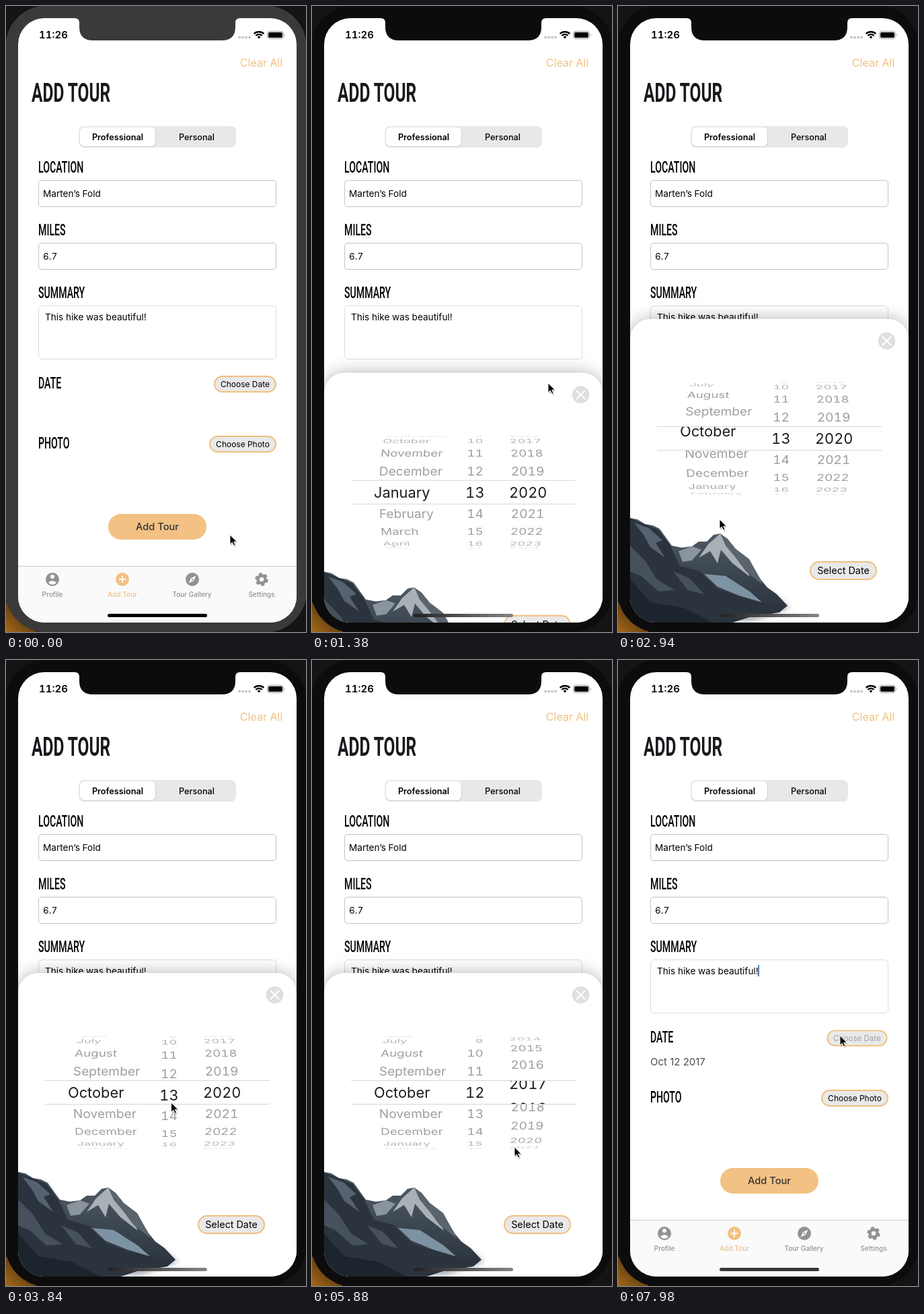
Recreate the animation shown at these times as an HTML page. Size 446 by 928 pixels, loop 8000 ms.

```html
<!DOCTYPE html>
<html lang="en">
<head>
<meta charset="utf-8">
<title>Add tour</title>
<style>
  html, body { margin: 0; width: 100%; height: 100%; overflow: hidden; background: #141414; }
  svg { display: block; width: 446px; height: 928px; }
  text { font: 13.6px Inter, sans-serif; font-variant-numeric: tabular-nums; }
  .title { font: 700 39.5px Roboto, sans-serif; fill: #17191d; }
  .label { font: 500 24px Roboto, sans-serif; }
  .mid { text-anchor: middle; }
  .field { fill: #fff; stroke: #c3c3c3; }
  .pill { fill: #e9e9e9; stroke: #f1bf80; stroke-width: 2; }
  .amber { fill: #f2c183; }
  .tab { font-size: 10px; font-weight: 500; text-anchor: middle; }
  .grey { fill: #929292; }
  .row { font-size: 19.3px; }
</style>
</head>
<body>
<svg viewBox="0 0 446 928">
  <defs>
    <clipPath id="screenClip"><rect x="18" y="18" width="414" height="896" rx="39"/></clipPath>
    <clipPath id="bandClip"><rect x="58" y="624" width="334" height="34"/></clipPath>
    <clipPath id="wheelClip"><path d="M58 552H392V623H58ZM58 659H392V730H58Z"/></clipPath>
    <clipPath id="ridgeClip"><path d="M18 759L29 761 40 768 52 770 62 775 72 789 80 800 95 803 110 801 120 794 132 794 142 784 152 782 163 790 175 805 195 820 205 838 212 850 222 862 236 872 252 889 240 899 195 906 170 914H18Z"/></clipPath>
    <linearGradient id="homeGrey"><stop stop-color="#222"/><stop offset="1" stop-color="#858585"/></linearGradient>
    <linearGradient id="rock" x2="0" y2="1"><stop stop-color="#56616c"/><stop offset="1" stop-color="#252e38"/></linearGradient>
    <linearGradient id="gold" x1="0" y1="1" x2="1" y2="0"><stop stop-color="#a5691a"/><stop offset="1" stop-color="#2b1c09"/></linearGradient>
    <filter id="soft" x="-20%" y="-20%" width="140%" height="140%"><feGaussianBlur stdDeviation="13"/></filter>
    <filter id="mist" x="-20%" y="-20%" width="140%" height="140%"><feGaussianBlur stdDeviation="4"/></filter>
  </defs>

  <rect width="446" height="928" fill="#141414"/>
  <rect y="885" width="45" height="43" fill="url(#gold)"/>
  <rect class="bezel" x="-1" y="-1" width="448" height="930" rx="62"/>

  <g clip-path="url(#screenClip)">
    <rect x="18" y="18" width="414" height="896" fill="#fff"/>

    <text x="49" y="48" style="font-size:15px;font-weight:600">11:26</text>
    <g fill="#c9c9c9"><circle cx="347" cy="46.500" r="2"/><circle cx="352" cy="46.500" r="2"/><circle cx="357" cy="46.500" r="2"/><circle cx="362" cy="46.500" r="2"/></g>
    <g fill="none" stroke="#000" stroke-width="2.300"><path d="M368.700 41.200a10.500 10.500 0 0 1 14.600 0M371.300 44a6.800 6.800 0 0 1 9.400 0"/></g>
    <path d="M373.600 45.800a3.700 3.700 0 0 1 4.800 0L376 48.400Z"/>
    <rect x="388.500" y="37.500" width="24" height="11" rx="3.500" fill="none" stroke="#999"/>
    <rect x="390" y="39" width="21" height="8" rx="2"/>
    <path d="M414 41v4q1.800-2 0-4" fill="#999"/>

    <text class="amber" x="411" y="90" text-anchor="end" style="font-size:16px">Clear All</text>
    <text class="title" transform="translate(38 142) scale(.62 1)">ADD TOUR</text>

    <rect x="108" y="178" width="234" height="32" rx="8" fill="#e8e8e9"/>
    <rect x="110" y="181" width="113" height="28" rx="7" fill="#000" opacity=".1"/>
    <rect x="110" y="180" width="112" height="28" rx="7" fill="#fff"/>
    <text class="mid" x="166" y="199" style="font-size:12.7px;font-weight:600">Professional</text>
    <text class="mid" x="283.500" y="199" style="font-size:12.7px;font-weight:500">Personal</text>

    <g id="labels"></g>
    <rect class="field" x="48.500" y="258.500" width="353" height="39" rx="4.500"/>
    <text x="55" y="283">Marten’s Fold</text>
    <rect class="field" x="48.500" y="351.500" width="353" height="39" rx="4.500"/>
    <text x="55" y="375.500">6.7</text>
    <rect class="field" x="48.500" y="444.500" width="353" height="79" rx="5.500" style="stroke:#dcdcdc"/>
    <text x="58" y="465.500">This hike was beautiful!</text>
    <rect id="caret" x="208" y="452" width="2" height="17" fill="#5480a8"/>

    <g id="chooseDate">
      <rect class="pill" x="310" y="549" width="91" height="23" rx="11.500"/>
      <text class="mid" x="355.500" y="565" style="font-size:12px">Choose Date</text>
    </g>
    <text id="date" x="48" y="601" fill="#4b4f55" style="font-size:15px;font-variant-numeric:normal">Oct 12 2017</text>
    <rect class="pill" x="303" y="638" width="98" height="23" rx="11.500"/>
    <text class="mid" x="352" y="654" style="font-size:12px">Choose Photo</text>
    <rect class="amber" x="152" y="753" width="146" height="38" rx="19"/>
    <text class="mid" x="225" y="777" fill="#333" style="font-size:14.6px;font-weight:500">Add Tour</text>

    <rect x="18" y="830" width="414" height="84" fill="#fafafa"/>
    <path d="M18 830.500H432" stroke="#cbcbcb"/>
    <g class="grey"><circle cx="69" cy="850" r="10"/><circle cx="277" cy="850" r="10"/></g>
    <circle class="amber" cx="173" cy="850" r="10"/>
    <g fill="#fafafa"><circle cx="69" cy="846" r="3"/><path d="M63 854.500q6-5 12 0q-2.200 3.200-6 3.200t-6-3.200M282.500 844.500L279 852l-7.500 3.500L275 848Z"/></g>
    <circle class="grey" cx="277" cy="850" r="1.200"/>
    <path d="M173 845v10M168 850h10" stroke="#fff" stroke-width="2"/>
    <g fill="none" stroke="#929292"><circle cx="380" cy="850" r="5.500" stroke-width="4.500"/><circle cx="380" cy="850" r="8" stroke-width="3.500" stroke-dasharray="4.700 3.678"/></g>
    <text class="tab grey" x="69" y="876">Profile</text>
    <text class="tab amber" x="173" y="876">Add Tour</text>
    <text class="tab grey" x="276.500" y="876">Tour Gallery</text>
    <text class="tab grey" x="380" y="876">Settings</text>

    <g id="sheet">
      <rect x="18" y="464" width="414" height="500" rx="30" opacity=".3" filter="url(#soft)"/>
      <rect x="18" y="464" width="414" height="500" rx="30" fill="#fff"/>
      <circle cx="399.500" cy="496.500" r="12.700" fill="#dfdfdf"/>
      <path d="M393 490l13 13m0-13l-13 13" stroke="#fff" stroke-width="2.200"/>
      <path d="M58 623.500H392M58 658.500H392" stroke="#d6d6d6"/>
      <g id="wheel" clip-path="url(#wheelClip)"></g>
      <g id="band" clip-path="url(#bandClip)"></g>

      <path d="M100 880L225 868 256 892 200 912H100Z" fill="#59636d" opacity=".5" filter="url(#mist)"/>
      <g clip-path="url(#ridgeClip)">
        <rect x="18" y="755" width="250" height="160" fill="url(#rock)"/>
        <path d="M152 782L134 798 120 818 137 808 148 826 153 806 170 826 196 846 181 815Z" fill="#aab1b6"/>
        <path d="M152 782L160 800 175 818 190 838 216 858 195 820Z" fill="#5a646d"/>
        <path d="M110 801L124 806 110 822 96 824 90 808Z" fill="#8a949c"/>
        <path d="M128 842L160 845 196 868 214 884 180 874 148 861Z" fill="#7d92a3"/>
        <path d="M18 759L40 768 60 776 78 800 92 830 122 838 150 866 190 878 240 893 170 914H18Z" fill="#2b343e"/>
        <path d="M24 766L46 774 66 792 56 796 70 818 48 802 38 784Z" fill="#566270"/>
        <path d="M18 800L40 822 58 850 84 866 60 868 36 846 18 838ZM82 838L106 848 128 872 104 866Z" fill="#46515d"/>
        <path d="M18 850L48 884 98 892 140 914H18Z" fill="#1c242d"/>
      </g>
      <rect class="pill" x="286" y="824" width="98" height="26" rx="13"/>
      <text class="mid" x="335" y="842" style="font-size:14.4px">Select Date</text>
    </g>
    <rect id="home" x="151" y="901" width="148" height="5" rx="2.500"/>
  </g>

  <path class="bezel" d="M102 18Q109 18 109 25V31Q109 51 129 51H321Q341 51 341 31V25Q341 18 348 18V10H102Z"/>
  <g id="cursor">
    <path d="M1 2v14l3.300-3 2.300 5 2.300-1-2.200-4.900h4.500Z" opacity=".25"/>
    <path d="M0 0v14l3.300-3 2.300 5 2.300-1-2.200-4.900h4.500Z" stroke="#fff" stroke-width=".9"/>
  </g>
</svg>
<script>
const LOOP = 8000;
const MONTHS = ['January', 'February', 'March', 'April', 'May', 'June', 'July',
  'August', 'September', 'October', 'November', 'December'];
const $ = id => document.getElementById(id);
const mod = (a, n) => ((a % n) + n) % n;

function add(parent, tag, attrs) {
  const node = document.createElementNS('http://www.w3.org/2000/svg', tag);
  for (const key in attrs) node.setAttribute(key, attrs[key]);
  return parent.appendChild(node);
}

[['LOCATION', 247], ['MILES', 340], ['SUMMARY', 433], ['DATE', 567], ['PHOTO', 656]].forEach(([name, y]) => {
  add($('labels'), 'text', { class: 'label', transform: `translate(48 ${y}) scale(.59 1)` }).textContent = name;
});

// Monotone cubic through [time, value] keys: passes keys smoothly, rests at holds.
function track(keys, t) {
  if (t <= keys[0][0]) return keys[0][1];
  const i = keys.findIndex(k => k[0] > t) - 1;
  if (i < 0) return keys[keys.length - 1][1];
  const slope = j => keys[j] && keys[j + 1] ? (keys[j + 1][1] - keys[j][1]) / (keys[j + 1][0] - keys[j][0]) : 0;
  const tangent = j => {
    const a = slope(j - 1), b = slope(j);
    return a * b > 0 ? 2 * a * b / (a + b) : 0;
  };
  const [t0, v0] = keys[i], [t1, v1] = keys[i + 1];
  const span = t1 - t0, u = (t - t0) / span, w = 1 - u;
  return v0 * w * w * (1 + 2 * u) + v1 * u * u * (3 - 2 * u)
    + span * u * w * (tangent(i) * w - tangent(i + 1) * u);
}

const pointer = [
  [0, 333, 784], [840, 351, 559], [1680, 351, 559], [2100, 149, 671], [2340, 153, 698],
  [2940, 151, 761], [3060, 151, 765], [3240, 151, 765], [3700, 245, 645], [4100, 246, 684],
  [4320, 246, 684], [4860, 319, 629], [4940, 319, 629], [5880, 301, 722], [5960, 301, 725],
  [6160, 301, 725], [6700, 335, 836], [6920, 335, 836], [7500, 331, 559], [7620, 330, 557]
];
const pointerX = pointer.map(([t, x]) => [t, x]);
const pointerY = pointer.map(([t, , y]) => [t, y]);
const sheetKeys = [[1212, 480], [1440, 0], [6960, 0], [7260, 480]];

const columns = [
  { x: 99, centre: 153, anchor: 'start', name: n => MONTHS[mod(n, 12)],
    keys: [[2120, 0], [2340, -.65], [2940, -2.7], [3060, -2.82], [3300, -3]] },
  { x: 255, centre: 245, anchor: 'end', name: n => mod(n - 1, 31) + 1,
    keys: [[3760, 13], [4100, 12.1], [4320, 12]] },
  { x: 296, centre: 320, anchor: 'start', name: n => n,
    keys: [[4980, 2020], [5880, 2017.35], [5960, 2017.26], [6200, 2017]] }
];
const MIDDLE = 641, RADIUS = 90, STEP = .36, DEPTH = 1000, VANISH_X = 240;

for (const column of columns) {
  const rows = (parent, count) => Array.from({ length: count }, () =>
    add(parent, 'text', { class: 'row', y: 7, 'text-anchor': column.anchor }));
  const zoom = `translate(${column.centre} ${MIDDLE}) scale(1.13) translate(${-column.centre} ${-MIDDLE})`;
  column.wheel = rows($('wheel'), 10);
  column.band = rows(add($('band'), 'g', { transform: zoom, fill: '#1c1c1c' }), 4);
}

// Each row sits on a cylinder seen in slight perspective.
function placeRows(column, rows, value, opacity) {
  const first = Math.floor(value) - rows.length / 2 + 1;
  rows.forEach((row, i) => {
    const n = first + i, angle = (n - value) * STEP, cos = Math.cos(angle), sin = Math.sin(angle);
    const scale = DEPTH / (DEPTH + RADIUS * (1 - cos));
    const x = VANISH_X + (column.x - VANISH_X) * scale;
    const skew = (VANISH_X - column.centre) * sin / DEPTH;
    row.textContent = column.name(n);
    row.setAttribute('transform', `matrix(${scale} 0 ${skew} ${Math.max(0, cos) * scale} ${x} ${MIDDLE + RADIUS * sin * scale})`);
    row.setAttribute('opacity', Math.abs(angle) > 1.57 ? 0 : opacity * Math.min(1, .25 + cos * 1.1));
  });
}

function draw(now) {
  const t = now % LOOP;
  const pressed = (t >= 960 && t < 1200) || t >= 7860;
  document.querySelectorAll('.bezel').forEach(b => b.setAttribute('fill', t < 900 ? '#3a3a3a' : '#0c0c0c'));
  $('cursor').setAttribute('transform', `translate(${track(pointerX, t)} ${track(pointerY, t)})`);
  $('sheet').setAttribute('transform', `translate(0 ${track(sheetKeys, t)})`);
  $('home').setAttribute('fill', t < 1212 ? '#000' : t < 7100 ? 'url(#homeGrey)' : '#383838');
  $('date').setAttribute('opacity', t > 6920 ? 1 : 0);
  $('caret').setAttribute('opacity', t >= 7620 ? 1 : 0);
  $('chooseDate').setAttribute('transform', pressed ? 'translate(355.5 560.5) scale(.97) translate(-355.5 -560.5)' : '');
  $('chooseDate').lastElementChild.setAttribute('opacity', pressed ? .3 : 1);
  for (const column of columns) {
    const value = track(column.keys, t);
    placeRows(column, column.wheel, value, .38);
    placeRows(column, column.band, value, 1);
  }
}

function tick() {
  draw(performance.now());
  requestAnimationFrame(tick);
}
tick();
</script>
</body>
</html>
```
